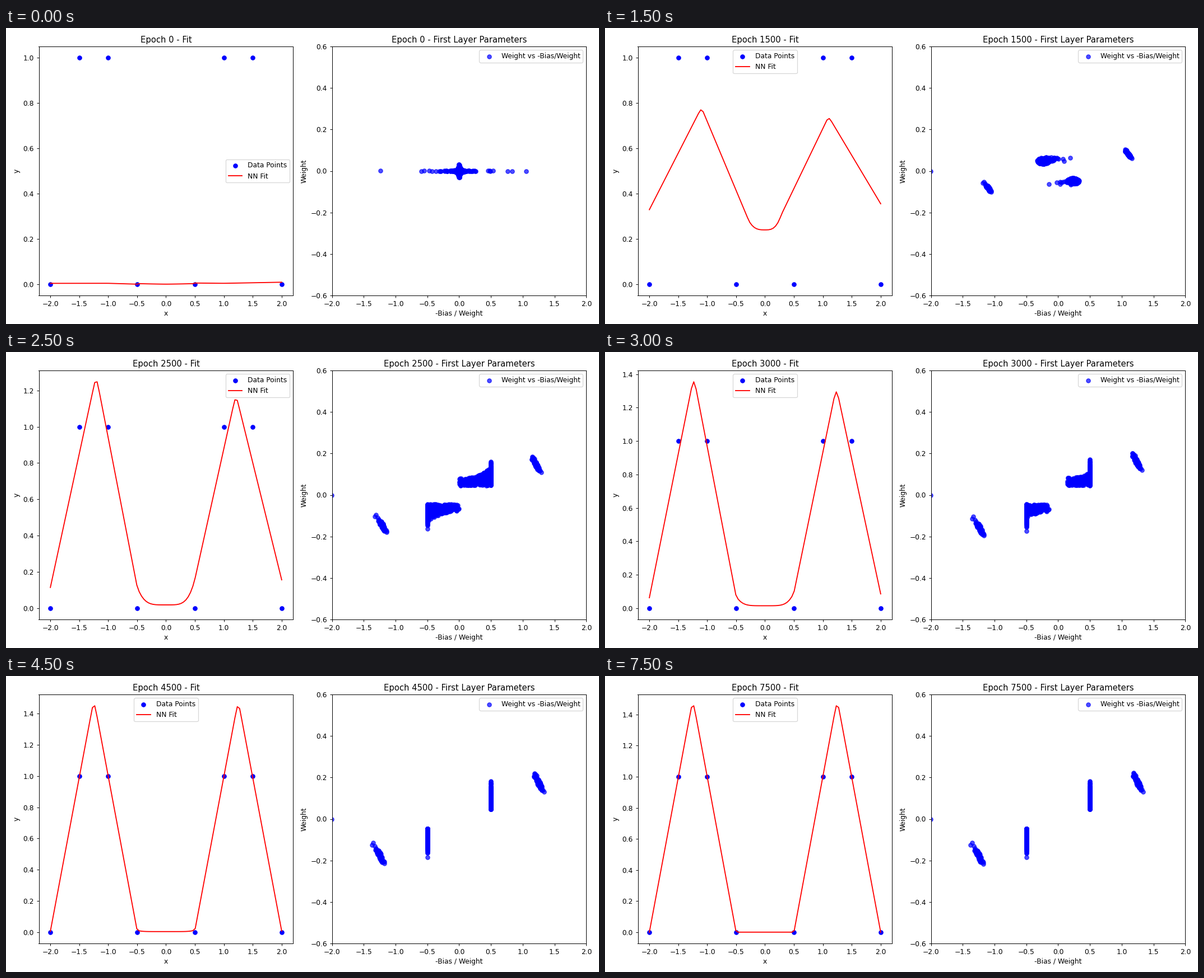
Write a matplotlib script that moves like this. It is 1058x529 px and loops after 8 s.

```python
import numpy as np
import matplotlib.pyplot as plt
from matplotlib.animation import FuncAnimation

W, H = 1058, 529
FRAMES, STEP = 16, 500
KEYS = [0, 1, 3, 5, 7, 11]
X = np.linspace(-2, 2, 100)


def ramp(step, *values):
    """Blend linearly between one value (or array) per key step."""
    j = np.clip(np.searchsorted(KEYS, step, side="right") - 1, 0, len(KEYS) - 2)
    a = min(1, (step - KEYS[j]) / (KEYS[j + 1] - KEYS[j]))
    return values[j] * (1 - a) + values[j + 1] * a


def peak_x(step):
    """Peaks drift from the inner data points to midway between each pair."""
    return 1.248 - .248 * np.exp(-(max(step - 1, 0) / 2.88) ** 1.84)


def centre_level(step):
    drop = .25 / (1 + np.exp(6 * (step - 3.3)))
    return min(step, 1) * (drop + max(0, .036 - .0036 * step))


def fit_curve(step):
    peak = ramp(step, .0037, .413, .76, 1.23, 1.476, 1.497)
    end = ramp(step, .006, .619, .342, .135, .0125, 0)
    rim_x = ramp(step, .5, .5, .28, .5, .5, .5)
    rim_y = ramp(step, .0024, .282, .293, .14, .025, 0)
    lean = ramp(step, .005, 0, .026, .042, .004, 0)
    mid, power = centre_level(step), 1.4 + .6 * step

    side = np.sign(X)
    tilt = side * lean / 2

    def slopes(r):
        base = np.interp(r, [rim_x, peak_x(step), 2], [rim_y, 0, end])
        tent = np.interp(r, [rim_x, peak_x(step), 2], [0, peak, 0])
        share = tent / peak
        return base + tent * (1 - side * lean) + tilt * (1 - share)

    r = abs(X)
    soft = np.mean([slopes(r + d) for d in np.linspace(-.03, .03, 9)], axis=0)
    arms = np.where((r > .8) & (r < 1.9), soft, slopes(r))
    rim = rim_y + tilt * min(step, 1)
    bowl = mid + (rim - mid) * np.minimum(r / rim_x, 1) ** power
    return np.where(r < rim_x, bowl, arms)


def initial(rng, n):
    """Near-zero biases: a narrow cross with a few wide ratios."""
    w = np.clip(rng.normal(0, .011, n), -.032, .032)
    return rng.normal(0, .00011, n) / w, w


def inner_group(sign, seed, n=380):
    """Neurons whose kinks cross the centre and stack up at x = +-0.5."""
    rng = np.random.default_rng(seed)
    x0, w0 = initial(rng, n)
    u, v, late = rng.random((3, n))
    rad, ang = np.sqrt(rng.random(n)), rng.uniform(0, 2 * np.pi, n)
    trail = late < .08

    gap1 = np.where(late < .012, rng.uniform(0, 1.4, n), 1)
    gap3 = .735 - .095 * rad * np.cos(ang) - trail * rng.exponential(.12, n)
    gap5 = .43 - .56 * v + .07 * (1 - v) ** 15
    w3 = np.where(trail, rng.uniform(.048, .066, n), .048 + .014 * rad * np.sin(ang))
    reach = (.035 + .09 * v ** 2) * u
    gaps = [.5 - sign * x0, gap1, gap3, gap5, gap5 - .29, gap5 - .87]
    weights = [sign * w0, .012 + .037 * u, w3,
               .045 + reach, .046 + 1.15 * reach, .047 + 1.17 * reach]

    def place(step):
        gap = ramp(step, *gaps)
        if step:
            gap = np.maximum(gap, 0)
        return sign * (.5 - gap), sign * ramp(step, *weights)
    return place


def outer_group(sign, seed, n=85):
    """Neurons that form the two peaks: a slanted, heavy-tailed cloud."""
    rng = np.random.default_rng(seed)
    x0, w0 = initial(rng, n)
    s = np.clip(rng.standard_t(4, n), -2.3, 4)
    jx, jw = rng.uniform(-1, 1, (2, n))

    def place(step):
        spread = ramp(step, 0, 0, .02, .028, .03, .03)
        x = peak_x(step) + spread * (s + .4 * jx)
        slant = np.exp(-.09 * s) * (1 + .07 * jw)
        w = ramp(step, sign * w0, .024 + .013 * jw,
                 .082 * slant, .147 * slant, .174 * slant, .177 * slant)
        return (sign * x if step else x0), sign * w
    return place


def idle(step):
    """One dead neuron sits on the left border."""
    return [-2.005 * min(step, 1)], [0]


GROUPS = [inner_group(1, 3), inner_group(-1, 8),
          outer_group(1, 5), outer_group(-1, 11), idle]

fig, (left, right) = plt.subplots(1, 2, figsize=(12, 6), dpi=W / 12)
fig.subplots_adjust(left=58.5 / W, right=1035.5 / W, wspace=69 / 454,
                    bottom=1 - 478 / H, top=1 - 33 / H)

points = np.array([-2, -1.5, -1, -.5, .5, 1, 1.5, 2])
left.scatter(points, (abs(abs(points) - 1.25) < .3).astype(int),
             color="blue", label="Data Points")
line, = left.plot(X, fit_curve(0), color="red", label="NN Fit")
left.set(xlabel="x", ylabel="y", xlim=(-2.2, 2.2))
left.legend(loc="best")

dots = right.scatter([], [], color="blue", alpha=.7, label="Weight vs -Bias/Weight")
right.set(xlabel="-Bias / Weight", ylabel="Weight", xlim=(-2, 2), ylim=(-.6, .6))
right.legend(loc="upper right")


def update(step):
    y = fit_curve(step)
    top = max(1, y.max())
    line.set_ydata(y)
    left.set_ylim(-.05 * top, 1.05 * top)
    dots.set_offsets(np.column_stack(
        [np.concatenate(c) for c in zip(*(place(step) for place in GROUPS))]))
    left.set_title(f"Epoch {step * STEP} - Fit")
    right.set_title(f"Epoch {step * STEP} - First Layer Parameters")
    return line, dots


anim = FuncAnimation(fig, update, frames=FRAMES, interval=STEP,
                     init_func=lambda: update(0), repeat=True, repeat_delay=0)
plt.show()
```
